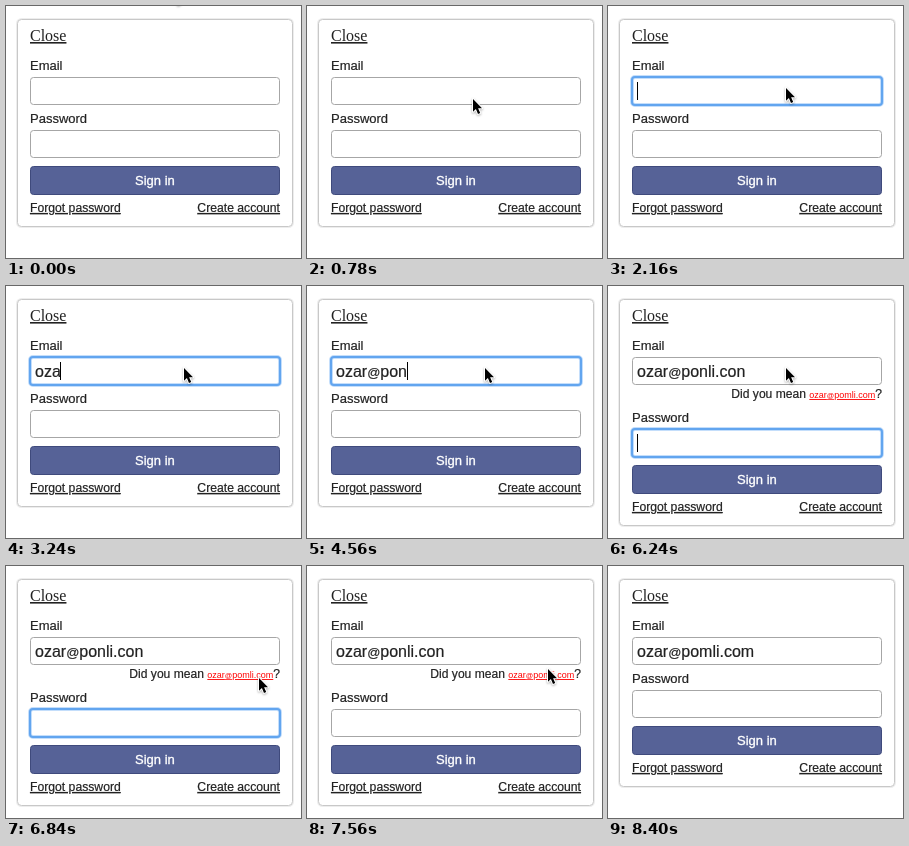
Animation of 295 by 252 pixels, one loop 8.88 s. Source, as an HTML page:

```html
<!DOCTYPE html>
<html lang="en">
<head>
<meta charset="utf-8">
<title>Sign in form</title>
<style>
html, body { margin: 0; width: 100%; height: 100%; overflow: hidden; background: #fff; }
svg { display: block; width: 100%; height: 100%; }
text { font: 13px "Liberation Sans", Arial, sans-serif; font-kerning: none; fill: #222; stroke: #222; stroke-width: .2; white-space: pre; }
.link { text-decoration: underline; text-decoration-skip-ink: none; }
.small { font-size: 12.2px; }
.end { text-anchor: end; }
#close { font: 16px "Liberation Serif", Times, serif; stroke: none; text-underline-offset: 1px; }
#value { font-size: 16px; }
.at { font-size: .81em; }
#hint { font-size: 12.1px; }
#fix { font-size: 9px; fill: #f00; stroke: none; }
#button { fill: #fff; stroke: #fff; stroke-width: .35; }
.panel { fill: #fff; stroke: #c8c8c8; }
.halo { stroke: #ededed; stroke-width: 3; }
.field { fill: #fff; stroke: #a6a6a6; }
#cursor path { stroke: #fff; stroke-width: 2; stroke-linejoin: round; paint-order: stroke; }
#cursor { filter: drop-shadow(0 1px .8px rgba(0, 0, 0, .3)); }
</style>
</head>
<body>
<svg viewBox="0 0 295 252">
  <defs>
    <g id="glow" fill="none">
      <rect x="24" y="71" width="250" height="28" rx="3" stroke="#c4defb" stroke-width="4"/>
      <rect x="24" y="71" width="250" height="28" rx="3" stroke="#62a5ef" stroke-width="2"/>
    </g>
  </defs>
  <rect class="panel halo" x="11.5" y="13.5" width="275" height="207" rx="4"/>
  <rect class="panel" x="11.5" y="13.5" width="275" height="207" rx="4"/>
  <text id="close" class="link" x="24" y="35">Close</text>
  <text x="24" y="64">Email</text>
  <rect class="field" x="24.5" y="71.5" width="249" height="27" rx="3"/>
  <use id="emailRing" href="#glow"/>
  <text id="value" x="29" y="91"></text>
  <path id="spelling" d="M30 92.7H106" stroke="#ee5048" stroke-width="2" stroke-linecap="round" stroke-dasharray="0.5 3.5"/>
  <text id="hint" class="end" x="274" y="112">Did you mean <tspan id="fix" class="link"></tspan>?</text>
  <g id="lower">
    <text x="24" y="117">Password</text>
    <rect class="field" x="24.5" y="124.5" width="249" height="27" rx="3"/>
    <use id="passRing" href="#glow" y="53"/>
    <rect x="24.5" y="160.5" width="249" height="28" rx="3" fill="#566297" stroke="#3f4a7c"/>
    <text id="button" x="129" y="179">Sign in</text>
    <text class="link small" x="24" y="206">Forgot password</text>
    <text class="link small end" x="274" y="206">Create account</text>
  </g>
  <rect id="caret" width="1" height="18"/>
  <g id="cursor"><path d="M1 1V13.7L3.9 11L6 15.9L8.2 14.9L6.1 10.2H10Z"/></g>
</svg>
<script>
const LOOP = 8880, STEP = 60;
const TYPED = 'ozar@ponli.con', FIXED = 'ozar@pomli.com';
const DOMAIN = TYPED.indexOf('@') + 1, DOT = TYPED.indexOf('.');
// Each pointer move is one quadratic curve starting where the last one ended
const MOVES = [
  { from: 360, to: 780, via: [142, 45], end: [165, 92] },
  { from: 1800, to: 1980, via: [171, 86], end: [177, 81] },
  { from: 6420, to: 7260, via: [295, 130], end: [240, 102] },
  { from: 7980, to: 8400, via: [194, 40], end: [154, -22] }
];
const $ = id => document.getElementById(id);
const show = (id, on) => $(id).style.display = on ? '' : 'none';
const within = (t, a, b) => t >= a && t < b;
const markup = s => s.replace('@', '<tspan class="at">@</tspan>');

// Slow steady keys for the name, a pause, then faster ones for the domain
const keyTime = i => i < DOMAIN ? 2580 + 240 * i : 4210 + 156 * (i - DOMAIN);
const typedCount = t => [...TYPED].filter((c, i) => keyTime(i) <= t).length;

function pointer(t) {
  let pos = [166, -17];
  for (const { from, to, via, end } of MOVES) {
    const u = Math.min(1, Math.max(0, (t - from) / (to - from))), v = 1 - u;
    pos = pos.map((p, i) => u ? v * v * p + 2 * u * v * via[i] + u * u * end[i] : p);
  }
  return pos.map(Math.round);
}

function draw(t) {
  const typing = within(t, 2160, 6240), hinting = within(t, 6240, 7620), inPass = within(t, 6240, 7560);
  const count = typedCount(t), value = $('value');
  value.innerHTML = markup(t < 7620 ? TYPED.slice(0, count) : FIXED);
  show('emailRing', typing);
  show('passRing', inPass);
  show('spelling', typing && count > DOT);
  show('hint', hinting);

  const grow = hinting ? 19 : 0;
  $('lower').setAttribute('transform', `translate(0 ${grow})`);
  document.querySelectorAll('.panel').forEach(p => p.setAttribute('height', 207 + grow));

  show('caret', within(t, 2160, 6000) || inPass && !within(t, 6780, 7260));
  const width = typing && count ? value.getComputedTextLength() : 0;
  $('caret').setAttribute('x', Math.floor(29.15 + width));
  $('caret').setAttribute('y', inPass ? 148 : 76);
  $('cursor').setAttribute('transform', `translate(${pointer(t)})`);
}

$('fix').innerHTML = markup(FIXED);
let start;
function frame(now) {
  start ??= now;
  draw(Math.floor((now - start) % LOOP / STEP) * STEP);
  requestAnimationFrame(frame);
}
draw(0);
requestAnimationFrame(frame);
</script>
</body>
</html>
```
